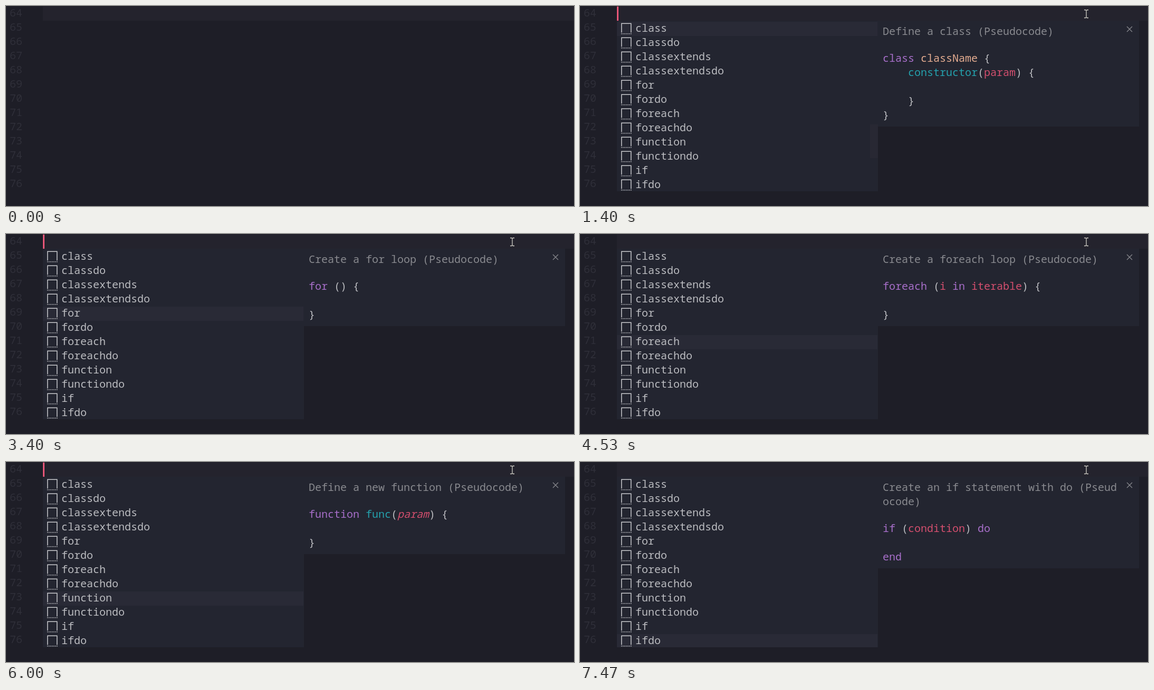
An HTML page for the animation above (8 s loop, 1077 by 380 pixels).

```html
<!DOCTYPE html>
<html lang="en">
<head>
<meta charset="utf-8">
<title>Snippet suggestions</title>
<style>
  html, body { margin: 0; width: 100%; height: 100%; overflow: hidden; background: #1e1e27; }
  body { position: relative; font: 20px/27px "Noto Sans Mono", monospace; color: #bbbcc0; }
  body > *, #list > * { position: absolute; }
  pre, p { margin: 0; font: inherit; }
  #line { left: 70px; top: 1px; right: 0; height: 27px; background: #24232d; }
  #numbers { left: 7px; top: -1px; color: #2f2f39; }
  #caret { left: 70px; top: 1px; width: 3px; height: 27px; background: #e95678; }
  #list { left: 70px; top: 28px; width: 495px; height: 324px; overflow: hidden; background: #232530; }
  #selection { left: 0; top: 2px; width: 494px; height: 27px; background: #292a36; }
  #thumb { left: 480px; top: 197px; width: 15px; height: 64px; background: #282833; }
  #labels { left: 35px; top: 0; }
  #list svg { left: 4.5px; }
  #doc { left: 565px; top: 28px; width: 486px; padding: 6px 0 9px 9px; background: #232530; }
  #title { width: 450px; margin-bottom: 24px; color: #898a8f; word-break: break-all; }
  #close { left: 1036px; top: 38px; }
  .keyword { color: #a86fca; }
  .type { color: #e4ac90; }
  .call { color: #24a1ad; }
  .name { color: #d44f6e; }
  .function .name { font-style: italic; }
</style>
</head>
<body>
<div id="line"></div>
<pre id="numbers"></pre>
<div id="caret"></div>
<div id="list">
  <div id="selection"></div>
  <div id="thumb"></div>
  <pre id="labels"></pre>
</div>
<div id="doc"><p id="title"></p><pre id="code"></pre></div>
<svg id="close" width="12" height="12" fill="none" stroke="#85868c" stroke-width="1.4">
  <path d="M1 1 11 11M11 1 1 11"/>
</svg>
<svg id="pointer" width="12" height="18" fill="none" stroke="#d2d0c8" stroke-width="1.3" style="left:0;top:0">
  <path d="M2 1.5H4.5L6 2.5 7.5 1.5H10M6 2V16M2 16.5H4.5L6 15.5 7.5 16.5H10"/>
</svg>
<script>
const LOOP = 8000;
const $ = id => document.getElementById(id);

const classBody = "\n    constructor(param) {\n\n    }\n}";
const block = "\n\n}";
// label, title, code, title of the do/end variant
const snippets = [
  ["class", "Define a class", "class className {" + classBody, ""],
  ["classextends", "Define a class which extends a superclass", "class className extends super {" + classBody, ""],
  ["for", "Create a for loop", "for () {" + block, " with do"],
  ["foreach", "Create a foreach loop", "foreach (i in iterable) {" + block, " with do"],
  ["function", "Define a new function", "function func(param) {" + block, " with do"],
  ["if", "Create an if statement", "if (condition) {" + block, " with do"]
];
const entries = snippets.flatMap(([label, title, code, suffix]) => [
  { label, title, code },
  { label: label + "do", title: title + suffix, code: code.replace(/{/g, "do").replace(/}/g, "end") }
]);

const tokens = {
  keyword: /^(class|extends|for|foreach|in|function|if|do|end)$/,
  type: /^(className|super)$/,
  call: /^(constructor|func)$/
};
const highlight = code => code.replace(/\w+/g, word => {
  const kind = Object.keys(tokens).find(k => tokens[k].test(word)) || "name";
  return `<span class="${kind}">${word}</span>`;
});

const selectTimes = [1400, 2070, 2530, 3000, 3400, 4000, 4530, 5130, 5670, 6270, 6800, 7400];
const caretToggles = [1000, 1470, 2000, 2470, 3000, 3470, 4000, 4470, 5000, 5470, 6000, 6470, 6930, 7470];
const pointerTimes = [530, 600, 670, 730, 800];
const passed = (times, t) => times.filter(time => time <= t).length;
const show = (id, on) => { $(id).style.visibility = on ? "visible" : "hidden"; };

$("numbers").textContent = Array.from({ length: 13 }, (_, i) => 64 + i).join("\n");
$("labels").textContent = entries.map(e => e.label).join("\n");
entries.forEach((_, i) => $("list").insertAdjacentHTML("beforeend",
  `<svg width="24" height="24" viewBox="0 0 16 16" fill="none" stroke="#c9cacd" style="top:${2.5 + 27 * i}px">
    <path d="M2.5 13V1.5H14.5V13"/><path d="M2 14.5H15" stroke-dasharray="1 1"/></svg>`));

let current = null;
function select(index) {
  if (index === current) return;
  current = index;
  for (const id of ["list", "doc", "close"]) $(id).style.display = index < 0 ? "none" : "block";
  if (index < 0) return;
  const { label, title, code } = entries[index];
  $("selection").style.top = 2 + 27 * index + "px";
  $("title").textContent = title + " (Pseudocode)";
  $("code").innerHTML = highlight(code);
  $("doc").className = label.startsWith("function") ? "function" : "";
}

function render(t) {
  select(passed(selectTimes, t) - 1);
  show("caret", passed(caretToggles, t) % 2);
  show("pointer", t >= 330);
  const move = passed(pointerTimes, t) / pointerTimes.length;
  $("pointer").style.transform = `translate(${Math.round(952 + 2 * move)}px, ${Math.round(27 - 21 * move)}px)`;
  $("thumb").style.opacity = Math.min(1, Math.max(0, (2700 - t) / 800));
}

const start = performance.now();
function tick() {
  render((performance.now() - start) % LOOP);
  requestAnimationFrame(tick);
}
tick();
</script>
</body>
</html>
```
